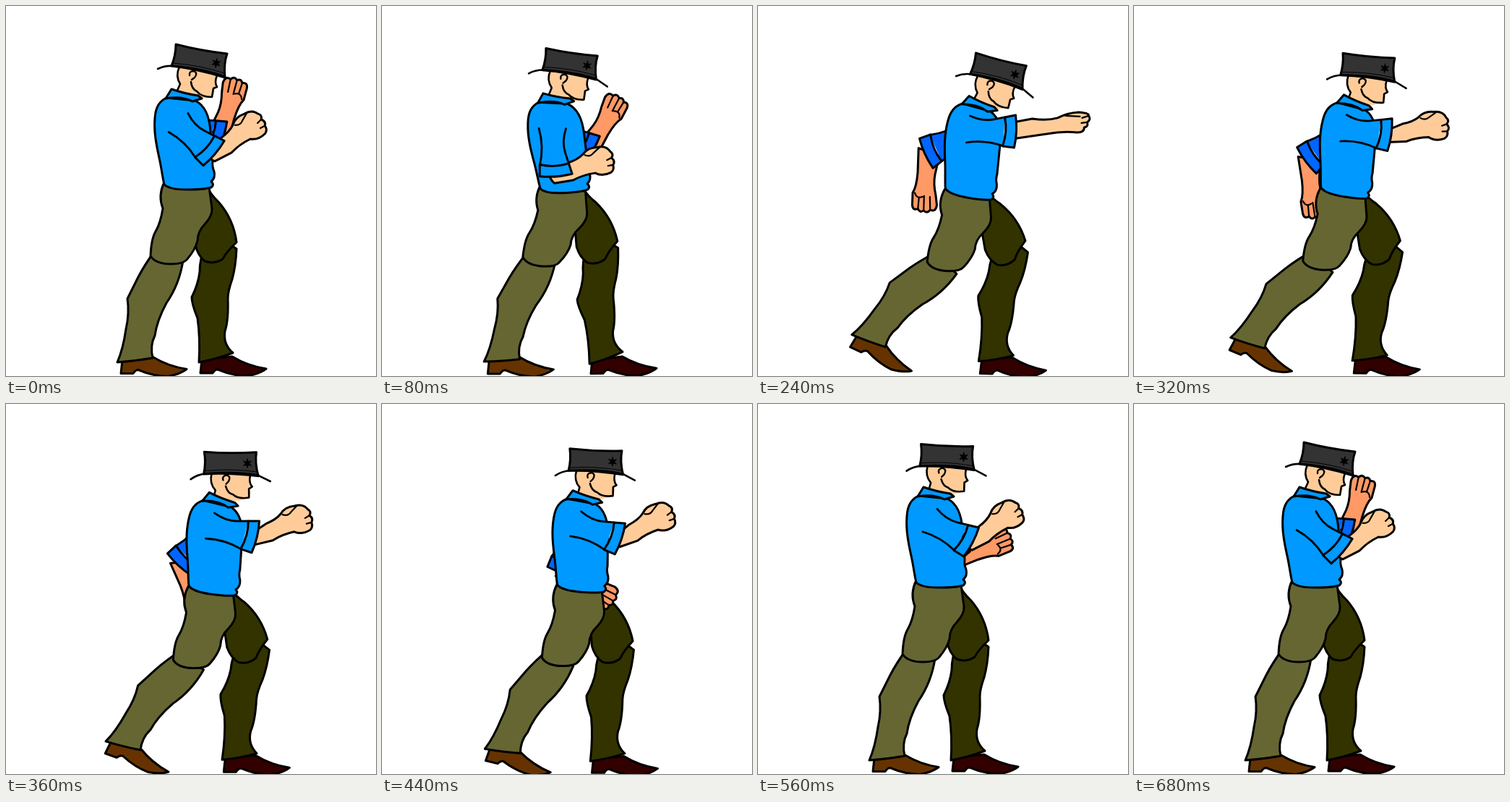
An HTML page with a canvas for the animation above (0.72 s loop, 512 by 512 pixels).

```html
<!DOCTYPE html>
<html lang="en">
<head>
<meta charset="utf-8">
<title>Boxer</title>
<style>
  html, body { margin: 0; width: 100%; height: 100%; overflow: hidden; background: #fff; }
  canvas { display: block; }
</style>
</head>
<body>
<canvas id="stage" width="512" height="512"></canvas>
<script>
const ctx = document.getElementById('stage').getContext('2d');
const LOOP = 720, STEP = 40;

// time, hip x, hip y, then absolute angles in degrees
const KEYS = ['t', 'x', 'y', 'torso', 'head', 'thighN', 'shinN', 'footN',
  'thighF', 'shinF', 'footF', 'armN', 'foreN', 'armF', 'foreF'];
const POSES = [
  [0,   250, 252,    0,   0, 0,  0,  0,   0,  0,  0,  38, -36,  16, -75],
  [160, 251, 261.4, -5.5, -4, 7,  6,  0, -10, -9, -2, 128,  0,  40, -49],
  [240, 289, 263,   10,   4, 3, 27, 25, -10,  6,  1,   0,   0, 153,  92],
  [280, 294, 262,   11,   0, 5, 28, 25, -10,  8,  1,   0,   0, 152,  96],
  [360, 283, 261,    8, -10, 1, 21, 20,  -8,  5,  0,  11, -22, 130,  66],
  [440, 273, 258,    5,  -8, 1, 14, 14,  -4,  3,  0,  16, -28, 105,  30],
  [560, 250, 252,    0,  -8, 0,  0,  0,   0,  0,  0,  25, -36,  54, -22],
  [680, 250, 252,    0,   0, 0,  0,  0,   0,  0,  0,  38, -36,  16, -75]
];

// joints in the resting pose
const HIP = [250, 252], NECK = [248, 122], SHOULDER = [236, 164];
const KNEE_N = [224, 348], ANKLE_N = [179, 489.5];
const KNEE_F = [293, 342], ANKLE_F = [289, 489];
const ZERO = [0, 0];

const SKIN = '#ffcc99', SKIN_F = '#ff9966', SHIRT = '#0099ff', SHIRT_F = '#0066ff', HAT = '#333333';

const shape = (d, fill, line = 3) => ({ path: new Path2D(d), fill, line });
const ink = (d, line = 2.6) => shape(d, null, line);

const FOOT = 'M-18 0L-20 19L-3 19Q0 14 4 14Q25 23 45 23Q62 20 71 13Q45 9 24 -4Z';

const sleeve = color => [
  shape('M3 -22Q28 -16 51 -20L49 20Q24 11 -2 15Z', color, 0),
  ink('M3 -22Q20 -14 36 -17L51 -20M-2 15Q24 11 49 20', 2.8),
  shape('M51 -20L66 -23Q69 0 64 22L48 20Q55 0 51 -20Z', color)
];

const star = (x, y, n, r1, r2) => {
  let d = '';
  for (let i = 0; i < n * 2; i++) {
    const a = Math.PI * i / n - 1.4, r = i % 2 ? r2 : r1;
    d += (i ? 'L' : 'M') + (x + r * Math.cos(a)) + ' ' + (y + r * Math.sin(a));
  }
  return d + 'Z';
};

const PARTS = {
  thighN: [shape('M219 244Q210 262 217 280Q214 300 207 312Q201 322 200 346Q207 357 228 357Q246 357 251 350Q262 337 265 325Q265 312 275 302Q286 290 285 280L281 250Z', '#666633')],
  shinN: [shape('M205 340Q192 358 183 375L168 405Q171 425 166 447Q162 475 154 493Q180 491 203 487Q199 470 206 456Q209 435 222 411Q240 385 245 352Z', '#666633')],
  footN: [shape(FOOT, '#663300')],
  thighF: [shape('M278 250Q284 262 294 271Q315 295 319 327Q305 340 300 350Q288 358 275 353Q265 345 262 330L262 270Z', '#333300')],
  shinF: [shape('M275 335Q268 350 268 368Q266 385 257 403Q257 412 265 432Q269 460 267 493Q290 489 314 480Q300 468 303 450Q308 435 307 405Q307 395 313 378Q318 360 319 336L310 330Z', '#333300')],
  footF: [shape(FOOT, '#330000')],
  torso: [
    shape('M222 127C212 132 207 140 206 155C204 178 210 200 213 215C216 230 217 240 219 247Q226 254 250 254Q275 254 284 251Q289 247 284 243Q290 238 288 229Q285 222 286 215L283 175C282 155 276 138 262 131Z', SHIRT),
    shape('M229 115L221 128Q243 124 258 132L271 128L266 124Q246 121 229 115Z', SHIRT)
  ],
  head: [
    shape('M240 82Q233 96 240 107L236 120L270 128L284 126Q290 121 288 115L293 112Q289 106 292 93Z', SKIN, 0),
    ink('M240 84Q234 97 241 108L236 119M256 105Q257 115 264 118Q270 126 285 126L287 114L292 112Q288 106 292 96'),
    ink('M254 96Q253 90 260 90Q266 93 261 99L257 102', 2.4),
    shape('M235 53Q270 62 306 66Q301 80 303 99Q265 87 229 83Q235 68 235 53Z', HAT),
    ink('M231 79Q270 82 302 93', 1),
    ink('M210 87Q220 82 232 83Q275 87 303 98L318 109'),
    shape(star(291, 79, 6, 6.5, 2.8), '#000', 0.6)
  ],
  armN: sleeve(SHIRT),
  armF: sleeve(SHIRT_F),
  fist: [
    shape('M-6 10Q-10 4 -9 -5L20 -11Q35 -11 44 -16Q53 -23 66 -19Q78 -18 81 -8Q85 -3 80 1Q84 7 79 11Q79 18 73 20Q60 22 52 14Q35 11 20 14Z', SKIN),
    ink('M46 -14Q52 -9 58 -13L69 -18M80 1L73 2M79 11L72 10', 2.2)
  ],
  reach: [
    shape('M-8 -11L24 -17Q45 -14 59 -18Q72 -25 88 -26Q103 -25 102 -21Q106 -16 100 -12Q102 -6 96 -5Q96 2 86 2Q66 0 44 4L-4 11Z', SKIN),
    ink('M70 -21L90 -20M102 -21L93 -18M100 -12L92 -11', 2.2)
  ],
  foreF: [
    shape('M-4 15L30 15Q50 16 58 21L75 21Q83 20 80 13Q86 10 82 5Q87 0 81 -4Q84 -12 74 -13L60 -11Q45 -7 32 -9L6 -14Z', SKIN_F),
    ink('M80 13L64 12M82 5L62 5M81 -4L63 -3M58 18Q67 15 63 7', 2.2)
  ]
};

// point p carried along when its part turns by deg around rest, now placed at pos
function follow(pos, deg, rest, p) {
  const a = deg * Math.PI / 180, c = Math.cos(a), s = Math.sin(a);
  const dx = p[0] - rest[0], dy = p[1] - rest[1];
  return [pos[0] + dx * c - dy * s, pos[1] + dx * s + dy * c];
}

function draw(name, pos, deg, rest = ZERO) {
  ctx.save();
  ctx.translate(pos[0], pos[1]);
  ctx.rotate(deg * Math.PI / 180);
  ctx.translate(-rest[0], -rest[1]);
  for (const s of PARTS[name]) {
    if (s.fill) { ctx.fillStyle = s.fill; ctx.fill(s.path); }
    if (s.line) { ctx.lineWidth = s.line; ctx.stroke(s.path); }
  }
  ctx.restore();
}

function poseAt(t) {
  let i = 0;
  while (i < POSES.length - 2 && t >= POSES[i + 1][0]) i++;
  const a = POSES[i], b = POSES[i + 1];
  const k = Math.min(1, (t - a[0]) / (b[0] - a[0]));
  const p = {};
  KEYS.forEach((key, j) => { p[key] = a[j] + (b[j] - a[j]) * k; });
  return p;
}

function leg(p, hip, side, kneeRest, ankleRest) {
  const thigh = p['thigh' + side], shin = p['shin' + side];
  const knee = follow(hip, thigh, HIP, kneeRest);
  const ankle = follow(knee, shin, kneeRest, ankleRest);
  draw('foot' + side, ankle, p['foot' + side]);
  draw('shin' + side, knee, shin, kneeRest);
  draw('thigh' + side, hip, thigh, HIP);
}

function render(t) {
  const p = poseAt(t), hip = [p.x, p.y];
  const shoulder = follow(hip, p.torso, HIP, SHOULDER);
  ctx.fillStyle = '#fff';
  ctx.fillRect(0, 0, 512, 512);
  ctx.strokeStyle = '#000';
  ctx.lineJoin = ctx.lineCap = 'round';

  leg(p, hip, 'F', KNEE_F, ANKLE_F);
  draw('head', follow(hip, p.torso, HIP, NECK), p.head, NECK);
  draw('foreF', follow(shoulder, p.armF, ZERO, [60, 0]), p.foreF);
  draw('armF', shoulder, p.armF);
  leg(p, hip, 'N', KNEE_N, ANKLE_N);
  draw('torso', hip, p.torso, HIP);
  const stretched = t >= 240 && t <= 280;
  draw(stretched ? 'reach' : 'fist', follow(shoulder, p.armN, ZERO, [65, -1]), p.foreN);
  draw('armN', shoulder, p.armN);
}

const start = performance.now();
function tick() {
  const t = (performance.now() - start) % LOOP;
  render(Math.floor(t / STEP) * STEP);
  requestAnimationFrame(tick);
}
tick();
</script>
</body>
</html>
```
